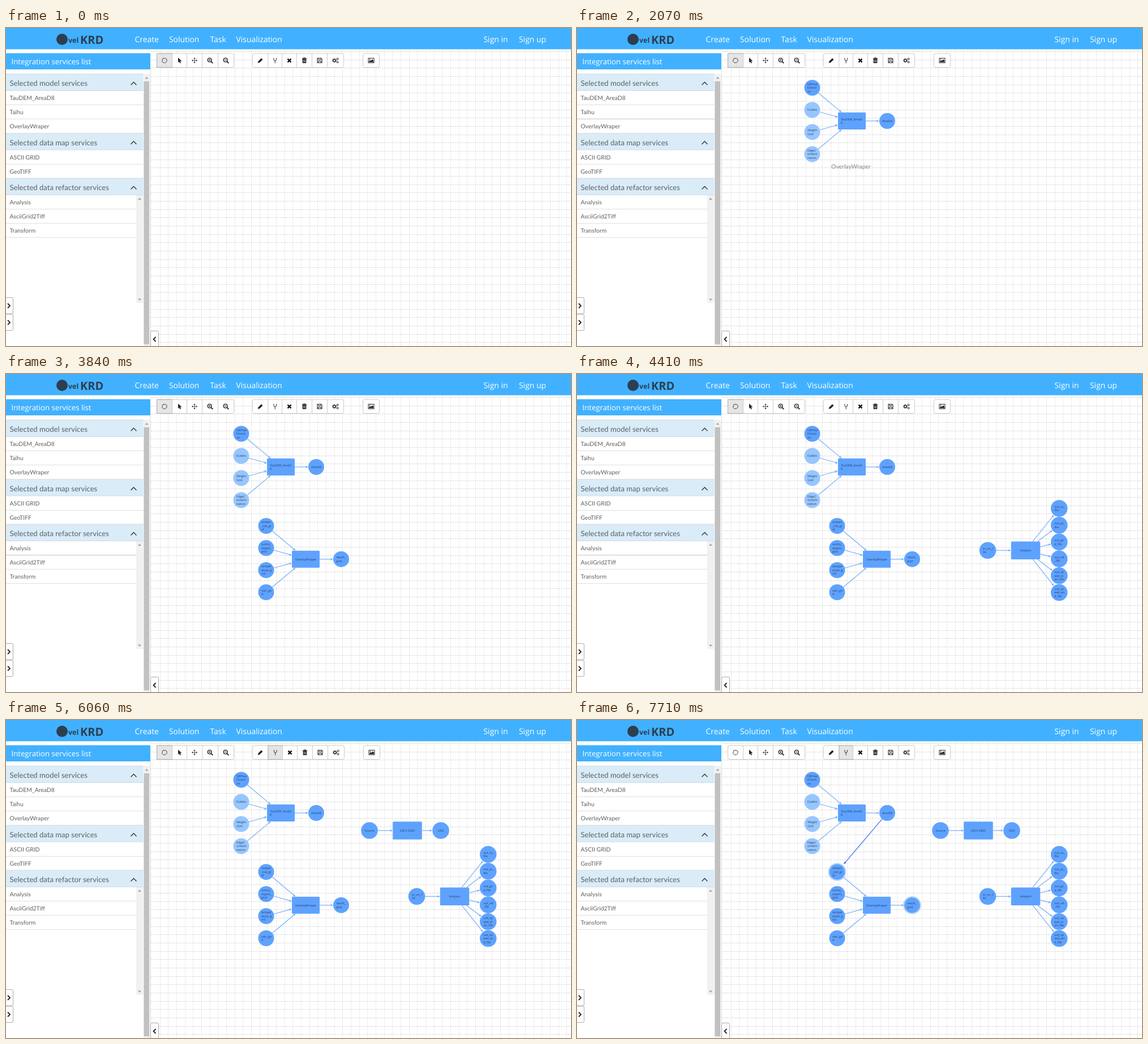
Recreate the animation shown at these times as an HTML page. Size 998 by 561 pixels, loop 8000 ms.

```html
<!DOCTYPE html>
<html lang="en">
<head>
<meta charset="utf-8">
<title>Integration services</title>
<style>
html, body { margin: 0; width: 100%; height: 100%; overflow: hidden; background: #fff; }
svg { display: block; width: 998px; height: 561px; }
text { font-family: "Open Sans", "Noto Sans", sans-serif; text-rendering: geometricPrecision; }
.list { font-family: Lato, "Open Sans", sans-serif; }
</style>
</head>
<body>
<svg id="stage" viewBox="0 0 998 561"></svg>
<script>
const LOOP = 8000;
const BLUE = "#5ea2fe", PALE = "#97c6fe", LINK = "#76b0fd", BAR = "#41b1ff";
const stage = document.getElementById("stage");

function add(tag, attrs = {}, parent = stage, content) {
  const el = document.createElementNS("http://www.w3.org/2000/svg", tag);
  for (const key in attrs) el.setAttribute(key, attrs[key]);
  if (content !== undefined) el.textContent = content;
  return parent.appendChild(el);
}
const box = (x, y, w, h, fill, parent, more) =>
  add("rect", { x, y, width: w, height: h, fill, ...more }, parent);
const path = (d, stroke, width, parent, more) =>
  add("path", { d, stroke, "stroke-width": width, fill: "none", ...more }, parent);
const label = (text, x, y, size, fill, parent, more) =>
  add("text", { x, y, "font-size": size, fill, ...more }, parent, text);
const group = (parent, attrs) => add("g", attrs, parent);

// Parts shown only inside given time spans
const timed = [];
function during(el, ...spans) {
  timed.push({ el, spans });
  return el;
}

function drawGrid() {
  const step = 14.67;
  for (let x = 271.5; x < 998; x += step) path(`M${Math.round(x) + .5} 38V561`, "#ececec", 1);
  for (let y = 41; y < 561; y += step)
    path(`M256 ${Math.round(y) + .5}H998`, "#dcdcdc", 1, stage, { "stroke-dasharray": "3 1" });
}

function drawHeader() {
  box(0, 0, 998, 37.5, BAR);
  add("circle", { cx: 99, cy: 20, r: 10, fill: "#2d3e50" });
  label("vel", 110, 26, 12.5, "#2d3e50", stage, { "font-weight": 700 });
  label("KRD", 131, 28, 20, "#2d3e50", stage, { "font-weight": 700 });
  [["Create", 227.5], ["Solution", 288], ["Task", 360.5], ["Visualization", 406.5],
   ["Sign in", 843.5], ["Sign up", 906]].forEach(([s, x]) => label(s, x, 25, 13.9, "#fff"));
}

const chevron = (x, y, parent) => path(`M${x - 5} ${y + 2.5}l5 -5l5 5`, "#333", 1.4, parent);
const wedge = (x, y, dir) => add("path", { d: `M${x - 3} ${y + dir * -1.5}h6l-3 ${dir * 3.5}z`, fill: "#a3a3a3" });

function drawSidebar() {
  box(0, 37.5, 256, 524, "#fff");
  path("M255.5 73V561", "#ddd", 1);
  box(0, 44.5, 255, 28.5, BAR);
  label("Integration services list", 9.5, 63.5, 13.2, "#fff");

  [["Selected model services", 81], ["Selected data map services", 185.5],
   ["Selected data refactor services", 265]].forEach(([s, y]) => {
    box(0, y, 242.5, 29.5, "#d9ecf7");
    path(`M0 ${y}H242.5M0 ${y + 29.5}H242.5`, "#cfdde6", 1);
    label(s, 6.5, y + 21, 13.1, "#5a6268", stage, { class: "list" });
    chevron(225.5, y + 17);
  });

  [["TauDEM_AreaD8", 123], ["Taihu", 148], ["OverlayWraper", 173], ["ASCII GRID", 228],
   ["GeoTIFF", 253], ["Analysis", 307], ["AsciiGrid2Tiff", 332], ["Transform", 357]].forEach(([s, y]) => {
    label(s, 6.5, y + 3.8, 10.4, "#606060", stage, { class: "list" });
    path(`M0 ${y + 12.5}H${y > 300 ? 230 : 242.5}`, "#e0e0e0", 1);
  });
  // Focus line left by the row last dragged
  [[135.5, 1050, 1800, 242.5], [160.5, 1800, 3840, 242.5], [319.5, 3840, 4770, 230],
   [240.5, 4770, 6060, 242.5]].forEach(([y, from, to, w]) =>
    during(path(`M0 ${y}H${w}`, "#c4c4c4", 1), [from, to]));

  box(243, 81, 11.5, 480, "#f1f1f1");
  box(243.5, 94, 9.5, 464, "#c1c1c1");
  during(box(243.5, 94, 9.5, 464, "#a8a8a8"), [600, 630]);
  wedge(248.5, 88, -1);
  box(230, 295, 12.5, 190, "#f1f1f1");
  wedge(236, 301.5, -1);
  wedge(236, 479, 1);

  const tab = (x, y, w, h) => box(x, y, w, h, "#fff", stage, { stroke: "#aaa", rx: 2 });
  for (const y of [475.5, 505]) {
    tab(-4, y, 16.5, 28.5);
    path(`M3 ${y + 10.5}l4 4l-4 4`, "#222", 1.8);
  }
  tab(255.5, 534.5, 14, 32);
  path("M264.5 545l-4 4l4 4", "#222", 1.8);
}

// Toolbar icons are drawn around their own centre
const icons = {
  lasso: g => path("M-3 -3.5L1 -4L4 -2V1.5L1.5 4H-2L-4.5 1.5Z", "#444", 1, g, { "stroke-linejoin": "round" }),
  pointer: g => add("path", { d: "M-2.5 -5L4 1.2H1L2.5 4.3L.8 5L-.6 2L-2.5 3.8Z", fill: "#222" }, g),
  move: g => {
    path("M-4 0H4M0 -4V4", "#333", .8, g);
    for (let a = 0; a < 360; a += 90)
      add("path", { d: "M-1.8 -3L0 -5L1.8 -3Z", fill: "#222", transform: `rotate(${a})` }, g);
  },
  zoom: (g, plus) => {
    add("circle", { cx: -.8, cy: -.8, r: 3.4, fill: "none", stroke: "#222", "stroke-width": 1.4 }, g);
    path("M1.8 1.8L4.8 4.8", "#222", 1.9, g);
    path("M-2.5 -.8H.9" + (plus ? "M-.8 -2.5V.9" : ""), "#222", 1, g);
  },
  zoomIn: g => icons.zoom(g, true),
  zoomOut: g => icons.zoom(g, false),
  pencil: g => add("path", { d: "M-4.5 4.5L-3.8 1.4L1.7 -4L4.2 -1.6L-1.3 3.8Z", fill: "#222" }, g),
  branch: g => path("M-2.3 -4.5V-2Q-2 0 0 .8V5M2.3 -4.5V-2Q2 0 0 .8", "#444", 1.1, g),
  cross: g => path("M-3 -3L3 3M3 -3L-3 3", "#111", 2.4, g),
  trash: g => {
    path("M-4.3 -3.2H4.3M-1.5 -3.4V-4.6H1.5V-3.4", "#222", 1.1, g);
    box(-3.3, -2.6, 6.6, 7.4, "#222", g, { rx: .8 });
    path("M-1.4 -1V3.3M0 -1V3.3M1.4 -1V3.3", "#fff", .6, g);
  },
  disk: g => {
    path("M-4 -4H2.5L4 -2.5V4H-4Z", "#222", 1.1, g);
    path("M-2 -3.8V-1.4H2V-3.8M-2.4 3.8V1H2.4V3.8", "#222", 1, g);
  },
  gears: g => [[-2, 0, 2.3], [3.5, -2.7, 1.2], [3.5, 2.9, 1.2]].forEach(([cx, cy, r]) => {
    add("circle", { cx, cy, r, fill: "none", stroke: "#222", "stroke-width": r * .65 }, g);
    add("circle", { cx, cy, r: r * 1.45, fill: "none", stroke: "#222", "stroke-width": .9, "stroke-dasharray": "1 1.1" }, g);
  }),
  image: g => {
    box(-5, -4, 10, 8, "#fff", g, { stroke: "#222" });
    add("path", { d: "M-3.8 3V1L-2 -.6L-.8 .6L2 -2L3.9 0V3Z", fill: "#222" }, g);
    add("circle", { cx: -2.4, cy: -1.9, r: .9, fill: "#222" }, g);
  }
};

const bars = [
  { edges: [266.5, 293.5, 319.5, 346.5, 374.5, 402.5], names: ["lasso", "pointer", "move", "zoomIn", "zoomOut"] },
  { edges: [435.5, 463, 487.5, 513.5, 540.5, 567.5, 596.5], names: ["pencil", "branch", "cross", "trash", "disk", "gears"] },
  { edges: [630.5, 659.5], names: ["image"] }
];

function drawToolbar(span, pressed, shift) {
  const parent = during(group(), span);
  for (const { edges, names } of bars) {
    const e = edges.map(x => x > 487 ? x + shift : x), last = e[e.length - 1];
    box(e[0], 45, last - e[0], 24.5, "#fff", parent, { rx: 3, stroke: "#ccc" });
    names.forEach((name, i) => {
      if (i) path(`M${e[i]} 45V69.5`, "#ccc", 1, parent);
      if (pressed.includes(name)) box(e[i], 45, e[i + 1] - e[i], 24.5, "#e5e5e5", parent, { stroke: "#adadad" });
      icons[name](group(parent, { transform: `translate(${(e[i] + e[i + 1]) / 2} 57.3)` }));
    });
  }
}

function arrow(parent, x1, y1, x2, y2, color) {
  const a = Math.atan2(y2 - y1, x2 - x1), c = Math.cos(a), s = Math.sin(a);
  const bx = x2 - 4.5 * c, by = y2 - 4.5 * s;
  path(`M${x1} ${y1}L${bx} ${by}`, color, 1.2, parent);
  add("path", { d: `M${x2} ${y2}L${bx - 2 * s} ${by + 2 * c}L${bx + 2 * s} ${by - 2 * c}Z`, fill: color }, parent);
}

function nodeText(parent, text, cx, cy, inset) {
  const lines = text.split("/"), one = lines.length === 1;
  lines.forEach((s, i) => label(s, one ? cx : cx - inset, cy + 1.8 + (i - (lines.length - 1) / 2) * 6.6,
    5.3, "#263f66", parent, { "text-anchor": one ? "middle" : "start" }));
}

function drawModel({ at, name, x, y, w, h, r, ins, outs }) {
  const g = during(group(stage), [at, LOOP]);
  const spot = isIn => ([text, cx, cy, color = BLUE]) => ({ text, cx, cy, color, isIn });
  const spots = [...ins.map(spot(true)), ...outs.map(spot(false))];
  for (const { cx, cy, isIn } of spots) {
    const dx = cx - x, dy = cy - y, len = Math.hypot(dx, dy);
    const k = Math.min(w / 2 / Math.abs(dx), dy ? h / 2 / Math.abs(dy) : 9);
    const rim = [x + dx * k, y + dy * k], edge = [cx - dx / len * r, cy - dy / len * r];
    arrow(g, ...(isIn ? [...edge, ...rim] : [...rim, ...edge]), LINK);
  }
  box(x - w / 2, y - h / 2, w, h, BLUE, g, { rx: 1.5 });
  nodeText(g, name, x, y, 19.5);
  for (const { text, cx, cy, color } of spots) {
    add("circle", { cx, cy, r, fill: color }, g);
    nodeText(g, text, cx, cy, 8.5);
  }
}

const models = [
  { at: 1350, name: "TauDEM_AreaD/8", x: 485.5, y: 164, w: 49, h: 30, r: 14,
    ins: [["D8Flow/Directi/on", 415.5, 105.5], ["Outlets", 415.5, 144.5, PALE],
          ["Weight/Grid", 415.5, 183.5, PALE], ["EdgeC/ontami/nation", 415.5, 222.5, PALE]],
    outs: [["AreaD8", 548, 164]] },
  { at: 2550, name: "OverlayWraper", x: 529.5, y: 326.7, w: 49, h: 30, r: 14,
    ins: [["stream/_net_gr/id", 459.5, 268], ["sunny_/aspect_/grid", 459.5, 307],
          ["temper/ature_g/rid", 459.5, 346], ["rain_gri/d", 459.5, 385]],
    outs: [["result_/grid", 592, 326.7]] },
  { at: 4410, name: "Analysis", x: 792.5, y: 311.2, w: 51.5, h: 31.5, r: 14.8,
    ins: [["in_src_f/ile", 725.5, 311.2]],
    outs: ["out_xs_/file", "out_ys_/file", "out_gri/d_file", "out_nd/_file", "out_sp/eed_st/art_file", "out_sp/eed_en/d_file"]
      .map((s, i) => [s, 851.7, 237 + i * 29.7]) },
  { at: 5310, name: "ASCII GRID", x: 709, y: 195, w: 51.5, h: 31.5, r: 14.8,
    ins: [["Source", 642, 195]], outs: [["UDX", 768, 195]] }
];

const ring = (cx, cy, from, to) =>
  during(add("circle", { cx, cy, r: 14.8, fill: "none", stroke: "#b4d3fa", "stroke-width": 2 }), [from, to]);

drawGrid();
drawSidebar();
drawHeader();
drawToolbar([0, 6060], ["lasso"], 0);
drawToolbar([6060, 6360], ["lasso", "branch"], 1);
drawToolbar([6360, LOOP], ["branch"], 0);
models.forEach(drawModel);

ring(548, 164, 6510, 6930);
ring(459.5, 268, 7500, LOOP);
ring(592, 326.7, 7710, LOOP);
during(box(504.5, 311.2, 50, 31, "none", stage, { stroke: "#b4d3fa", "stroke-width": 2, rx: 2 }), [2610, 2670]);
during(path("M469.5 375.3L510 345", "#5a8ff5", 1.4), [2700, 2790]);

const LINE_BLUE = "#3f68f6";
const finalLink = during(group(), [7530, LOOP]);
arrow(finalLink, 539, 174.7, 471.2, 254.3, LINE_BLUE);
const rubber = path("", LINE_BLUE, 1.2);

// Each drag: text, then [time, x, y] stops
const drags = [
  ["TauDEM_AreaD8", [[1050, 46, 123], [1110, 155, 130], [1170, 290, 143], [1230, 382, 153], [1350, 465, 164]]],
  ["OverlayWraper", [[1800, 42, 173], [1860, 132, 178], [1950, 392, 191], [2010, 474, 212], [2070, 484, 244],
    [2190, 540, 253], [2310, 627, 254], [2400, 779, 256], [2490, 520, 292], [2550, 505, 312]]],
  ["Analysis", [[3840, 24, 307], [3900, 83, 306], [3960, 181, 306], [4140, 550, 300], [4290, 928, 305], [4410, 792, 311]]],
  ["ASCII GRID", [[4770, 32, 228], [4860, 148, 227], [5040, 400, 215], [5220, 680, 198], [5310, 709, 195]]]
];
const linkPath = [[6840, 548, 164], [7020, 533, 185], [7260, 497, 226], [7440, 468, 259], [7530, 460, 268]];
const ghost = label("", 0, 0, 10.4, "#858585", stage, { class: "list", "text-anchor": "middle" });

function along(stops, t) {
  const i = stops.findIndex(s => s[0] > t);
  if (i < 1) return null;
  const [t0, x0, y0] = stops[i - 1], [t1, x1, y1] = stops[i], k = (t - t0) / (t1 - t0);
  return [x0 + (x1 - x0) * k, y0 + (y1 - y0) * k];
}

function render(t) {
  for (const { el, spans } of timed)
    el.style.display = spans.some(([a, b]) => t >= a && t < b) ? "" : "none";

  const tick = Math.floor(t / 30) * 30;
  const drag = drags.find(([, stops]) => tick > stops[0][0] && along(stops, tick));
  ghost.style.display = drag ? "" : "none";
  if (drag) {
    const [x, y] = along(drag[1], tick);
    ghost.textContent = drag[0];
    ghost.setAttribute("x", x);
    ghost.setAttribute("y", y + 3.8);
  }

  const tip = tick > 6840 && along(linkPath, tick);
  rubber.setAttribute("d", tip ? `M548 164L${tip[0]} ${tip[1]}` : "");
}

const start = performance.now();
function frame() {
  render((performance.now() - start) % LOOP);
  requestAnimationFrame(frame);
}
frame();
</script>
</body>
</html>
```
